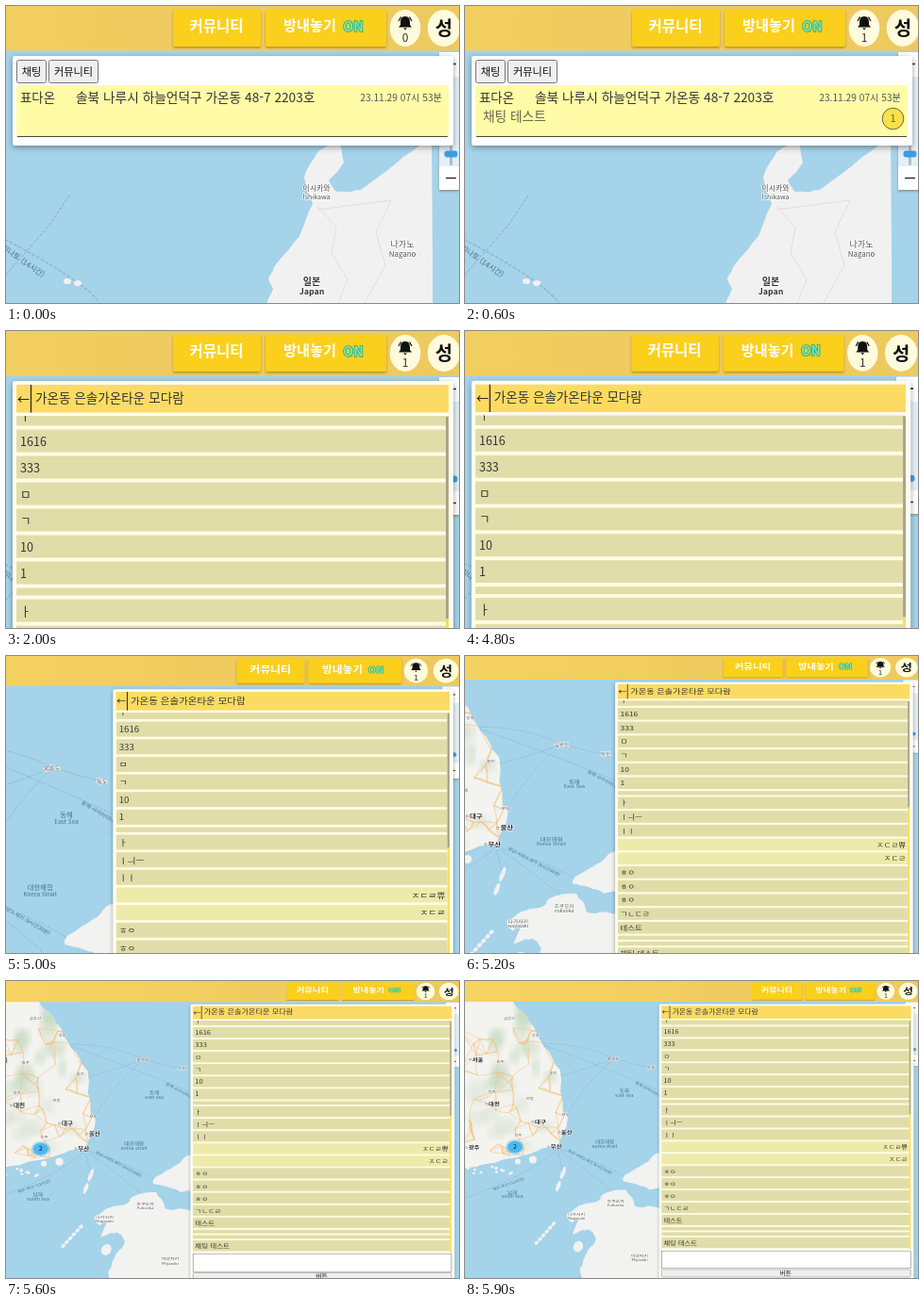
Animation of 480 by 315 pixels, one loop 8000 ms. Source, as an HTML page:

```html
<!DOCTYPE html>
<html lang="ko">
<head>
<meta charset="utf-8">
<title>커뮤니티 채팅</title>
<style>
html, body { margin: 0; width: 100%; height: 100%; overflow: hidden; background: #a5d3ea; }
svg { display: block; width: 100vw; height: 100vh; }
text { font-family: "Noto Sans CJK KR", "Noto Sans CJK JP", "Noto Sans CJK", sans-serif; white-space: pre; }
</style>
</head>
<body>
<svg viewBox="0 0 480 315" preserveAspectRatio="none">
  <defs>
    <linearGradient id="gold" x1="0" y1="0" x2="1" y2="0">
      <stop offset="0" stop-color="#f8d462"/><stop offset=".6" stop-color="#f0cc60"/><stop offset="1" stop-color="#edc95e"/>
    </linearGradient>
    <filter id="shade" x="-10%" y="-10%" width="120%" height="130%">
      <feDropShadow dx="0" dy="2" stdDeviation="3" flood-color="#000" flood-opacity=".38"/>
    </filter>
    <filter id="low" x="-10%" y="-20%" width="120%" height="160%">
      <feDropShadow dx="0" dy="1.5" stdDeviation="1.2" flood-color="#5a4300" flood-opacity=".45"/>
    </filter>
    <filter id="soft"><feGaussianBlur stdDeviation="3"/></filter>
    <clipPath id="listClip"><rect x="11" y="90" width="458" height="526"/></clipPath>
    <clipPath id="korea"></clipPath>
  </defs>
  <g id="world">
    <g id="map"></g>
    <g id="bar"></g>
    <g id="inbox"></g>
    <g id="chat"></g>
  </g>
</svg>
<script>
const NS = 'http://www.w3.org/2000/svg';
const $ = id => document.getElementById(id);

function el(parent, tag, attrs, content) {
  const node = document.createElementNS(NS, tag);
  for (const key in attrs) node.setAttribute(key, attrs[key]);
  if (content !== undefined) node.textContent = content;
  parent.appendChild(node);
  return node;
}
const rect = (p, x, y, width, height, fill, more) =>
  el(p, 'rect', { x, y, width, height, fill, ...more });
const line = (p, d, stroke, more) =>
  el(p, 'path', { d, stroke, fill: 'none', ...more });
// y is the middle of the line of text
const text = (p, x, y, str, size, more) =>
  el(p, 'text', { x, y: y + size * 0.36, 'font-size': size, fill: '#333', ...more }, str);
const mid = { 'text-anchor': 'middle' };
const bold = { 'font-weight': 700 };

let seed = 11;
const rnd = () => (seed = seed * 16807 % 2147483647) / 2147483647;

// splits every edge twice and nudges the new points, for a ragged shore
function shore(corners, rough) {
  let pts = corners.split(' ').map(p => p.split(',').map(Number));
  for (let pass = 0; pass < 2; pass++, rough /= 2)
    pts = pts.flatMap((p, i) => {
      const q = pts[(i + 1) % pts.length];
      return [p, [0, 1].map(a => (p[a] + q[a]) / 2 + (rnd() - .5) * rough)];
    });
  return `M${pts.map(p => p.map(v => v.toFixed(1))).join('L')}Z`;
}

function drawKorea(west) {
  const d = shore('-30,10 46,10 52,24 68,43 84,70 101,94 104,137 109,145 98,175 68,183 40,189 0,198 -30,190', 5);
  el($('korea'), 'path', { d });
  el(west, 'path', { d, fill: '#f3f3ef' });
  const inland = el(west, 'g', { 'clip-path': 'url(#korea)' });
  for (let i = 0; i < 26; i++) {
    const y = 20 + rnd() * 160;
    el(inland, 'ellipse', { cx: 12 + rnd() * 85, cy: y, rx: 4 + rnd() * 8, ry: 4 + rnd() * 9,
      fill: '#bfd6ba', opacity: y < 110 ? .5 : .28, filter: 'url(#soft)' });
  }
  const towns = Array.from({ length: 60 }, () => [rnd() * 112 - 6, 50 + rnd() * 135]);
  const near = (a, b) => Math.hypot(a[0] - b[0], a[1] - b[1]);
  for (const a of towns) {
    const next = [...towns].sort((b, c) => near(a, b) - near(a, c)).slice(1, 4);
    for (const b of next) {
      const bend = [0, 1].map(i => (a[i] + b[i]) / 2 + (rnd() - .5) * 5);
      line(inland, `M${a}Q${bend} ${b}`, '#f3bd78', { 'stroke-width': .65, opacity: .8 });
    }
  }
}

function drawMap(map) {
  rect(map, -400, 0, 900, 720, '#a5d3ea');

  // the western part is laid out on a coarser grid
  const west = el(map, 'g', { transform: 'translate(-349.5 0) scale(1.73 2.169)' });
  const land = (corners, rough) => el(west, 'path', { d: shore(corners, rough), fill: '#f2f2f0' });
  drawKorea(west);
  land('225,180 206,182 197,188 182,198 170,205 168,212 182,215 196,221 225,216', 3);
  land('171,221 146,226 141,233 124,237 108,246 113,256 121,252 114,268 131,263 139,272 131,284 122,304 127,325 225,325 225,246 196,238 180,238', 4);
  const islet = (cx, cy, rx, ry, turn = 0) =>
    el(west, 'ellipse', { cx, cy, rx, ry, fill: '#f2f2f0', transform: `rotate(${turn} ${cx} ${cy})` });
  islet(104, 203, 2, 7, 20);
  islet(99, 217, 2, 6, 20);
  islet(120, 281, 5, 6, 30);
  islet(72, 189, 4, 4);
  islet(56, 191, 3, 3);
  for (let i = 0; i < 6; i++) islet(76 + i * 3.6, 277 - i * 4, 2.5, 1.8, -40);
  for (let i = 0; i < 14; i++) islet(rnd() * 50, 194 + rnd() * 10, 1.6, 1.2);

  const ferry = (from, d) => line(west, `M${from}${d}`, '#6d9dbd',
    { 'stroke-width': .5, 'stroke-dasharray': '2 1', opacity: .7 });
  const ulleung = '158 82', busan = '98 177';
  for (const d of ['Q125 66 82 66', 'Q132 92 102 100', 'Q128 108 108 142', 'L196 92']) ferry(ulleung, d);
  for (const d of ['Q140 190 168 206', 'Q135 204 158 224', 'Q75 202 0 230', 'L104 203']) ferry(busan, d);
  ferry('84 68', 'Q150 92 206 116T262 150');

  // central Honshu and two small islands left of it
  el(map, 'path', {
    d: shore('451,139 421,160 376,195 350,197 342,185 358,166 353,140 331,154 316,182 325,210 311,244 286,274 278,289 283,300 275,320 275,690 451,690', 3),
    fill: '#f2f1f1'
  });
  line(map, 'M330 216L408 206 392 240 402 275 380 315M330 212L350 235 345 262 362 290 352 315', '#e2dde2');
  for (const [cx, cy] of [[65, 292], [76, 294]]) el(map, 'ellipse', { cx, cy, rx: 4, ry: 3, fill: '#f2f1f1' });
  line(map, 'M67 201L47 231 0 285', '#7e9db5', { 'stroke-width': .8, 'stroke-dasharray': '3 2' });

  const place = (x, y, ko, en, size = 8.5, color = '#4c4c4c', more) => {
    const style = { ...mid, fill: color, stroke: '#fff', 'stroke-width': 1.5, 'paint-order': 'stroke', ...more };
    text(map, x, y, ko, size, style);
    text(map, x, y + size * 1.13, en, size * .88, style);
  };
  place(329, 193, '이시카와', 'Ishikawa', 8);
  place(420, 253, '나가노', 'Nagano', 9);
  place(324, 292, '일본', 'Japan', 10, '#333', { 'font-weight': 600 });
  const sea = (x, y, ko, en) => place(x, y, ko, en, 9.5, '#3f718f', { 'stroke-width': 0 });
  sea(-57, 253, '동해', 'East Sea');
  sea(-93, 369, '대한해협', 'Korea Strait');
  sea(-263, 485, '남해', 'South Sea');
  place(-145, 536, '나가사키', 'Nagasaki');
  place(-73, 505, '후쿠오카', 'Fukuoka');
  place(-29, 631, '미야자키', 'Miyazaki');
  place(-77, 179, '울릉도', '');
  place(-8, 199, '독도', '');

  const towns = '-268,85,금강산 -220,124,강릉 -188,212,울진 -165,307,포항 -230,271,안동 -285,185,원주 -300,254,청주 -252,354,진주';
  const cities = '-326,180,서울 -296,282,대전 -211,323,대구 -163,347,울산 -182,380,부산 -333,382,광주';
  const each = (list, draw) => list.split(' ').forEach(item => draw(...item.split(',')));
  each(towns, (x, y, name) => place(x, +y, name, '', 7.5));
  each(cities, (x, y, name) => {
    place(x, +y, name, '', 11, '#222', { 'font-weight': 600 });
    el(map, 'circle', { cx: x - 14, cy: y, r: 2, fill: '#fff', stroke: '#555', 'stroke-width': .8 });
  });

  const route = (x, y, angle, str) => text(map, 0, 0, str, 8,
    { ...mid, fill: '#47708b', transform: `translate(${x} ${y}) rotate(${angle})` });
  route(2, 259, 35, '동해-사카이미나토 (14시간)');
  route(-120, 415, 34, '부산-시모노세키 (8시간30분)');
  route(-270, 466, -24, '제주-부산 (12시간)');

  el(map, 'circle', { cx: -258, cy: 381, r: 17, fill: '#58c2f5', opacity: .45 });
  el(map, 'circle', { cx: -258, cy: 381, r: 13.5, fill: '#4db8f0' });
  text(map, -258, 381, '2', 12, { ...mid, fill: '#113' });

  // zoom control
  rect(map, 459, 49, 25, 146, '#e4eff6', { filter: 'url(#low)' });
  rect(map, 459, 49, 25, 26, '#fff');
  rect(map, 459, 170, 25, 25, '#fff');
  line(map, 'M466 61.5H477M471.5 56V67M466 182.5H477', '#333', { 'stroke-width': 1.6 });
  line(map, 'M471.5 76V169', '#a9bfd0', { 'stroke-width': 3 });
  rect(map, 464.5, 153.5, 14, 7, '#3f9ee0', { rx: 3 });
}

function drawBar(bar) {
  rect(bar, -400, -6, 900, 53.5, 'url(#gold)');
  const white = { ...mid, ...bold, fill: '#fff' };
  for (const [x, w] of [[177, 93], [275, 128]])
    rect(bar, x, 4, w, 39, '#fad01f', { rx: 2, filter: 'url(#low)' });
  text(bar, 223, 21, '커뮤니티', 15.5, white);
  text(bar, 322, 21, '방내놓기', 15.2, white);
  text(bar, 368, 21.5, 'ON', 14, { ...mid, ...bold, fill: '#7fe3b4', stroke: '#1fae74', 'stroke-width': 1.6, 'paint-order': 'stroke' });
  for (const [cx, rx] of [[423, 16.3], [464, 17.3]])
    el(bar, 'ellipse', { cx, cy: 23.5, rx, ry: 19.5, fill: '#fffbdc' });
  el(bar, 'path', { d: 'M423 11c-4 0 -5 3 -5 6v3l-2 2.5h14l-2 -2.5v-3c0 -3 -1 -6 -5 -6ZM421 23.5h4l-2 2Z', fill: '#111' });
  line(bar, 'M418.5 11.5l-2.5 4.5M427.5 11.5l2.5 4.5', '#111', { 'stroke-width': 1.2 });
  text(bar, 464, 24, '성', 20, { ...mid, ...bold, fill: '#111' });
  return text(bar, 423, 34, '0', 12, mid);
}

function drawInbox(box) {
  rect(box, 7, 53, 467, 95, '#fff', { rx: 3, filter: 'url(#shade)' });
  for (const [x, w, label] of [[11.5, 31, '채팅'], [45.5, 52, '커뮤니티']]) {
    rect(box, x, 57.5, w, 24, '#efefef', { rx: 2, stroke: '#777' });
    text(box, x + w / 2, 70, label, 11.2, { ...mid, fill: '#111' });
  }
  rect(box, 11, 84, 458, 55, '#fffba6', { rx: 3 });
  line(box, 'M12 138.5H468', '#4b4a36', { 'stroke-width': 1.2 });
  text(box, 15, 97, '표다온', 13.4, { 'font-weight': 500 });
  text(box, 74, 97, '솔북 나루시 하늘언덕구 가온동 48-7 2203호', 13.7, { 'font-weight': 500 });
  text(box, 462, 97, '23.11.29 07시 53분', 10.2, { 'text-anchor': 'end', fill: '#555' });
  const fresh = el(box, 'g', {});
  text(fresh, 19, 117, '채팅 테스트', 13.7);
  el(fresh, 'circle', { cx: 453.5, cy: 119.5, r: 11.3, fill: '#fbd72b', stroke: '#333' });
  text(fresh, 453.5, 119.5, '1', 11, mid);
  return fresh;
}

function drawChat(chat) {
  rect(chat, 7, 53, 467, 630, '#fffdf0', { rx: 3, filter: 'url(#shade)' });
  rect(chat, 11, 57, 458, 29.5, '#fbdb63');
  line(chat, 'M26.5 57V86.5', '#333', { 'stroke-width': 1.4 });
  text(chat, 18.5, 72, '←', 13, { ...mid, fill: '#111' });
  text(chat, 31, 71, '가온동 은솔가온타운 모다람', 13.6);

  const list = el(chat, 'g', { 'clip-path': 'url(#listClip)' });
  rect(list, 11, 90, 458, 526, '#fffce2');
  // an empty message makes a low row, a leading ">" one of your own
  const rows = ['ㅏ', '1616', '333', 'ㅁ', 'ㄱ', '10', '1', '', 'ㅏ', 'ㅣㅢㅡ', 'ㅣㅣ', '>ㅈㄷㄹ쀼', '>ㅈㄷㄹ',
    'ㅎㅇ', 'ㅎㅇ', 'ㅎㅇ', 'ㄱㄴㄷㄹ', '테스트', '', '', '채팅 테스트'];
  let y = 76.5;
  for (const row of rows) {
    const own = row[0] === '>', h = row ? 24 : 8;
    rect(list, 11, y, 455, h, own ? '#eeeaa9' : '#e1dda9');
    if (own) text(list, 463, y + 12.5, row.slice(1), 12.6, { 'text-anchor': 'end' });
    else text(list, 15, y + 12.5, row, 12.6);
    y += h + 4;
  }
  rect(list, 466, 90, 3, 526, '#fbdc55');
  rect(list, 466, 91, 3, 214, '#aaa38c');

  rect(chat, 11.5, 619.5, 457, 40, '#fff', { stroke: '#777' });
  rect(chat, 11.5, 662, 457, 17.5, '#efefef', { rx: 2, stroke: '#888' });
  text(chat, 239, 670.5, '버튼', 11.5, { ...mid, fill: '#111' });
}

drawMap($('map'));
const count = drawBar($('bar'));
const fresh = drawInbox($('inbox'));
drawChat($('chat'));

const LOOP = 8000, NEWS = 500, OPEN = 2000, ZOOM = 4800, STEP = 100, STEPS = 11;
const clamp = (v, lo, hi) => Math.max(lo, Math.min(hi, v));

// the left edge eases out exponentially, the height follows a damped spring
function camera(k) {
  const left = -349.5 * (1 - Math.exp(-.23 * k)) / (1 - Math.exp(-.23 * STEPS));
  const a = .1 + .68 * k;
  const sx = 480 / (482 - left);
  const sy = 1 / (1 + 1.169 * (1 - (1 + a) * Math.exp(-a)));
  return `matrix(${sx} 0 0 ${sy} ${-left * sx} 0)`;
}

function draw(t) {
  const open = t >= OPEN;
  $('chat').style.display = open ? '' : 'none';
  $('inbox').style.display = open ? 'none' : '';
  count.textContent = t >= NEWS ? '1' : '0';
  fresh.setAttribute('opacity', clamp((Math.floor((t - NEWS) / STEP) + 2) / 4, 0, 1) * (t >= NEWS));
  const k = Math.min(STEPS, Math.floor((t - ZOOM) / STEP));
  $('world').setAttribute('transform', t < ZOOM ? '' : camera(k));
}

const start = performance.now();
function tick() {
  draw((performance.now() - start) % LOOP);
  requestAnimationFrame(tick);
}
draw(0);
requestAnimationFrame(tick);
</script>
</body>
</html>
```
